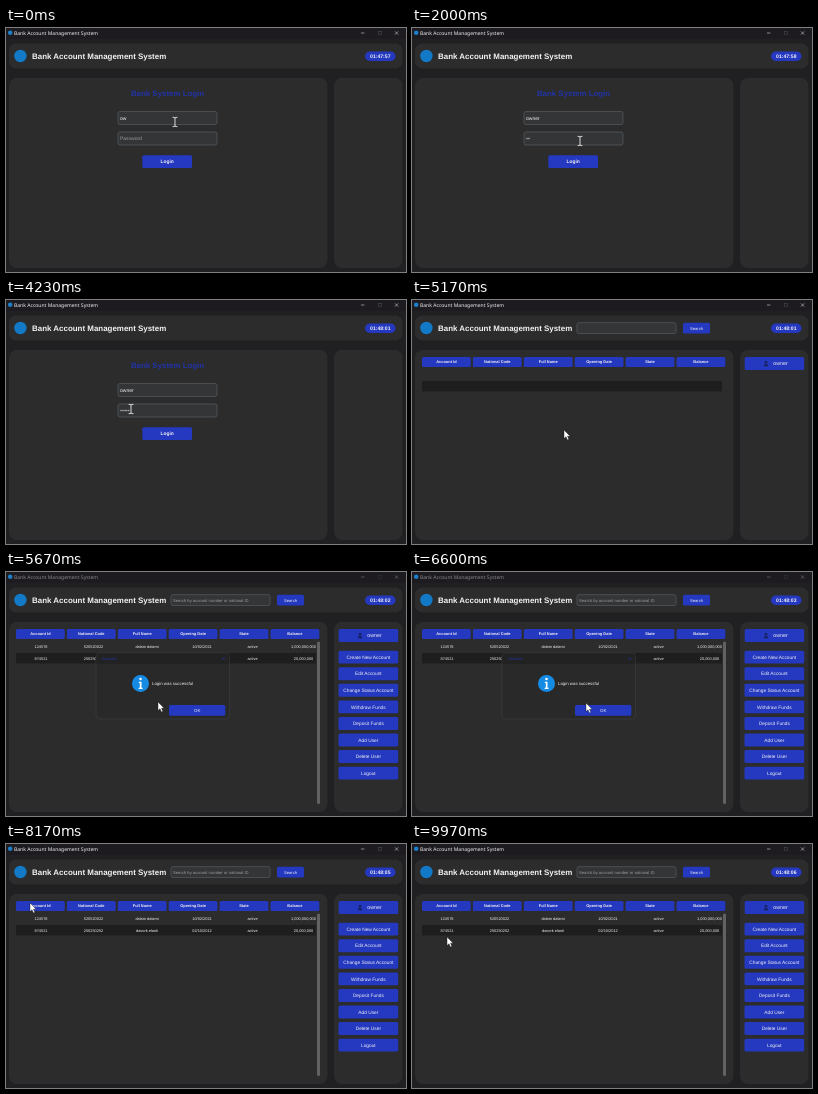
Write an HTML page that moves like this. It is 400x244 px and loops after 10000 ms.

```html
<!DOCTYPE html>
<html lang="en">
<head>
<meta charset="utf-8">
<title>Bank Account Management System</title>
<style>
html, body { margin: 0; width: 100%; height: 100%; overflow: hidden; background: #201f21; }
svg { display: block; width: 100vw; height: 100vh; font-family: "Liberation Sans", Arial, sans-serif; text-rendering: geometricPrecision; }
text { fill: #f2f2f4; white-space: pre; }
.mid { text-anchor: middle; }
.bold { font-weight: bold; }
.panel { fill: #2c2c2d; }
.btn { fill: #2439c0; }
.entry { fill: #333537; stroke: #575c5f; stroke-width: .7; }
.hint { fill: #9b9c9e; }
.blue { fill: #2234a4; }
.bar { font-family: "Noto Sans", "Open Sans", sans-serif; font-size: 5.05px; }

/* Screens switch hard */
.login, .main, .data, .dialog, .caption, .beam, .arrow, .strip, .ask { animation: 10s step-end infinite; }
.login { animation-name: login; }
.main { animation-name: main; }
.data { animation-name: data; }
.dialog { animation-name: dialog; }
.caption { animation-name: dim; }
.beam { animation-name: beam; }
.arrow { animation-name: arrow; }
.ask { animation-name: ask; }
.strip { animation-name: tick; }
@keyframes login { 0% { visibility: visible } 50.9%, 100% { visibility: hidden } }
@keyframes main { 0% { visibility: hidden } 50.9%, 100% { visibility: visible } }
@keyframes data { 0% { visibility: hidden } 52.2%, 100% { visibility: visible } }
@keyframes dialog { 0% { visibility: hidden } 56% { visibility: visible } 73.5%, 100% { visibility: hidden } }
@keyframes dim { 0% { opacity: 1 } 56% { opacity: .5 } 73.5%, 100% { opacity: 1 } }
@keyframes beam { 0% { visibility: visible } 45.4%, 100% { visibility: hidden } }
@keyframes arrow { 0% { visibility: hidden } 45.4%, 100% { visibility: visible } }
@keyframes ask { 0% { visibility: visible } 16.5%, 100% { visibility: hidden } }

/* The clock lags once, while the login is handled */
@keyframes tick {
  0% { transform: translateY(0) }
  10.15% { transform: translateY(-12px) }
  20.3% { transform: translateY(-24px) }
  30.45% { transform: translateY(-36px) }
  40.6% { transform: translateY(-48px) }
  52.2% { transform: translateY(-60px) }
  60.9% { transform: translateY(-72px) }
  71.05% { transform: translateY(-84px) }
  81.2% { transform: translateY(-96px) }
  91.35%, 100% { transform: translateY(-108px) }
}

.key { fill: transparent; animation: key 10s step-end infinite; }
@keyframes key { 0% { fill: #f2f2f4 } 65%, 100% { fill: transparent } }

.pointer { animation: move 10s ease-in-out infinite; }
@keyframes move {
  0%, 8% { transform: translate(169px, 94px) }
  13%, 32% { transform: translate(168px, 113px) }
  39%, 42.7% { transform: translate(125px, 109px) }
  48%, 62.3% { transform: translate(152px, 130px) }
  65.5%, 74% { transform: translate(174px, 131px) }
  81%, 83.5% { transform: translate(24px, 59px) }
  93%, 100% { transform: translate(35px, 93px) }
}
</style>
</head>
<body>
<svg viewBox="0 0 400 244" preserveAspectRatio="none">
  <defs><clipPath id="pill"><rect x="359" y="23.5" width="30.5" height="9.5" rx="4.7"/></clipPath></defs>
  <rect width="400" height="244" fill="#201f21"/>
  <rect width="400" height="10.5" fill="#1d1b20"/>
  <circle cx="4.2" cy="4.8" r="2.3" fill="#1c7fc6"/>
  <g class="caption">
    <text class="bar" x="8" y="6.7">Bank Account Management System</text>
    <g fill="none" stroke="#d5d5d7" stroke-width=".6">
      <path d="M355 5h3.4M389 3.4l3.2 3.2M392.2 3.4l-3.2 3.2"/>
      <rect x="372.2" y="3.5" width="3" height="3" stroke="#4b4a4e"/>
    </g>
  </g>

  <rect class="panel" x="3" y="15.5" width="393.5" height="25" rx="7"/>
  <rect class="panel" x="3" y="50" width="318.5" height="190" rx="8"/>
  <rect class="panel" x="328" y="50" width="68.5" height="190" rx="8"/>
  <circle cx="14.4" cy="28" r="6.2" fill="#1279c6"/>
  <text class="bold" x="26" y="31" font-size="7.95">Bank Account Management System</text>
  <rect class="btn" x="359" y="23.5" width="30.5" height="9.5" rx="4.7"/>
  <g clip-path="url(#pill)"><g class="strip" id="clock"></g></g>

  <g class="login" id="login">
    <text class="bold blue mid" x="161.5" y="67.8" font-size="7.9">Bank System Login</text>
    <rect class="entry" x="112" y="83.5" width="99" height="13" rx="2"/>
    <rect class="entry" x="112" y="104" width="99" height="13" rx="2"/>
    <text class="hint ask" x="114" y="112.3" font-size="5">Password</text>
  </g>

  <g class="main" id="main">
    <rect class="entry" x="165" y="22.7" width="99" height="10.8" rx="1.8"/>
    <rect x="10" y="81" width="300" height="10.5" fill="#1e1e1f"/>
  </g>

  <g class="data" id="data">
    <text class="hint" x="167" y="29.6" font-size="4.18">Search by account number or national ID</text>
    <rect x="311" y="69.5" width="3" height="162.5" rx="1.5" fill="#626264"/>
  </g>

  <g class="dialog" id="dialog">
    <rect x="90" y="81" width="133.5" height="66" rx="4" fill="#29292a" stroke="#414143" stroke-width=".6"/>
    <path d="M90.3 92v-7q0-3.7 3.7-3.7h125.5q3.7 0 3.7 3.7v7z" fill="#222223"/>
    <text class="blue" x="96" y="88.2" font-size="4">Success</text>
    <path d="M216.4 85.2l2.6 2.6M219 85.2l-2.6 2.6" stroke="#2234a4" stroke-width=".6"/>
    <circle cx="134.5" cy="111.5" r="8.5" fill="#168be4"/>
    <circle cx="134.5" cy="107" r="1.25" fill="#fff"/>
    <path d="M132.8 109.7h2.7v6h1.1v1.2h-4v-1.2h1.2v-4.8h-1z" fill="#fff"/>
    <text x="146" y="113.2" font-size="4.35">Login was successful</text>
  </g>

  <g class="pointer">
    <path class="beam" d="M-2.4-4.6h1.6q.8 0 .8.8q0-.8.8-.8h1.6M0-4v8M-2.4 4.6h1.6q.8 0 .8-.8q0 .8.8.8h1.6" fill="none" stroke="#f4f4f4" stroke-width=".85"/>
    <path class="arrow" d="M0 0v8.6l2-1.8 1.4 3.1 1.5-.7-1.4-3h2.7z" fill="#fff" stroke="#111" stroke-width=".4"/>
  </g>
</svg>
<script>
const $ = id => document.getElementById(id);

function add(parent, tag, attrs, text = "") {
  const el = document.createElementNS("http://www.w3.org/2000/svg", tag);
  for (const name in attrs) el.setAttribute(name, attrs[name]);
  el.textContent = text;
  parent.append(el);
  return el;
}

function label(parent, text, x, y, size, cls = "mid") {
  return add(parent, "text", { x, y, "font-size": size, class: cls }, text);
}

function button(parent, text, x, y, width, height, size, cls = "mid") {
  add(parent, "rect", { class: "btn", x, y, width, height, rx: 1.5 });
  label(parent, text, x + width / 2, y + height / 2 + size * .36, size, cls);
}

// Characters appear at their times in ms; null means already typed
function type(x, y, chars, times) {
  const line = label($("login"), "", x, y, 5, "");
  [...chars].forEach((char, i) => {
    const at = times[i];
    add(line, "tspan", at === null ? {} : { class: "key", style: `animation-delay:${at}ms` }, char);
  });
}

for (let i = 0; i < 10; i++) {
  const s = 57 + i;
  const time = `01:${47 + Math.floor(s / 60)}:${String(s % 60).padStart(2, "0")}`;
  label($("clock"), time, 374.3, 30.1 + 12 * i, 5.1, "mid bold");
}

type(114, 91.8, "owner", [null, null, 230, 450, 640]);
type(114, 113, "*****", [1650, 1900, 2250, 2550, 2850]);
button($("login"), "Login", 136.3, 127.3, 49.7, 12.8, 4.9, "mid bold");

const main = $("main"), data = $("data");
button(main, "Search", 271, 22.7, 27, 10.8, 4.1);
["Account Id", "National Code", "Full Name", "Opening Date", "State", "Balance"]
  .forEach((name, i) => button(main, name, 10 + 50.9 * i, 57, 48.8, 10, 3.95, "mid bold"));
button(main, "", 332.7, 57, 59.5, 13, 5);
label(main, "owner", 368.5, 65.3, 5.3);
add(main, "path", { d: "M351.7 66.3q0-2.4 2.3-2.4t2.3 2.4zM354 60.8a1.4 1.4 0 1 1-.01 0z", fill: "#18215f" });

const columns = [35, 87.5, 141, 196, 246.5, 297.5];
[
  ["124578", "520520022", "dalam dalami", "10/02/2021", "active", "1,000,000,000"],
  ["874521", "250250252", "davork elanti", "02/10/2012", "active", "20,000,000"],
].forEach((row, r) => row.forEach((cell, c) => label(data, cell, columns[c], 75.8 + 11.9 * r, 3.9)));

["Create New Account", "Edit Account", "Change Status Account", "Withdraw Funds",
  "Deposit Funds", "Add User", "Delete User", "Logout"]
  .forEach((name, i) => button(data, name, 332.5, 78.7 + 16.57 * i, 59.7, 12.9, 4.8));

button($("dialog"), "OK", 163, 133, 56.3, 10.8, 4.4);
</script>
</body>
</html>
```
